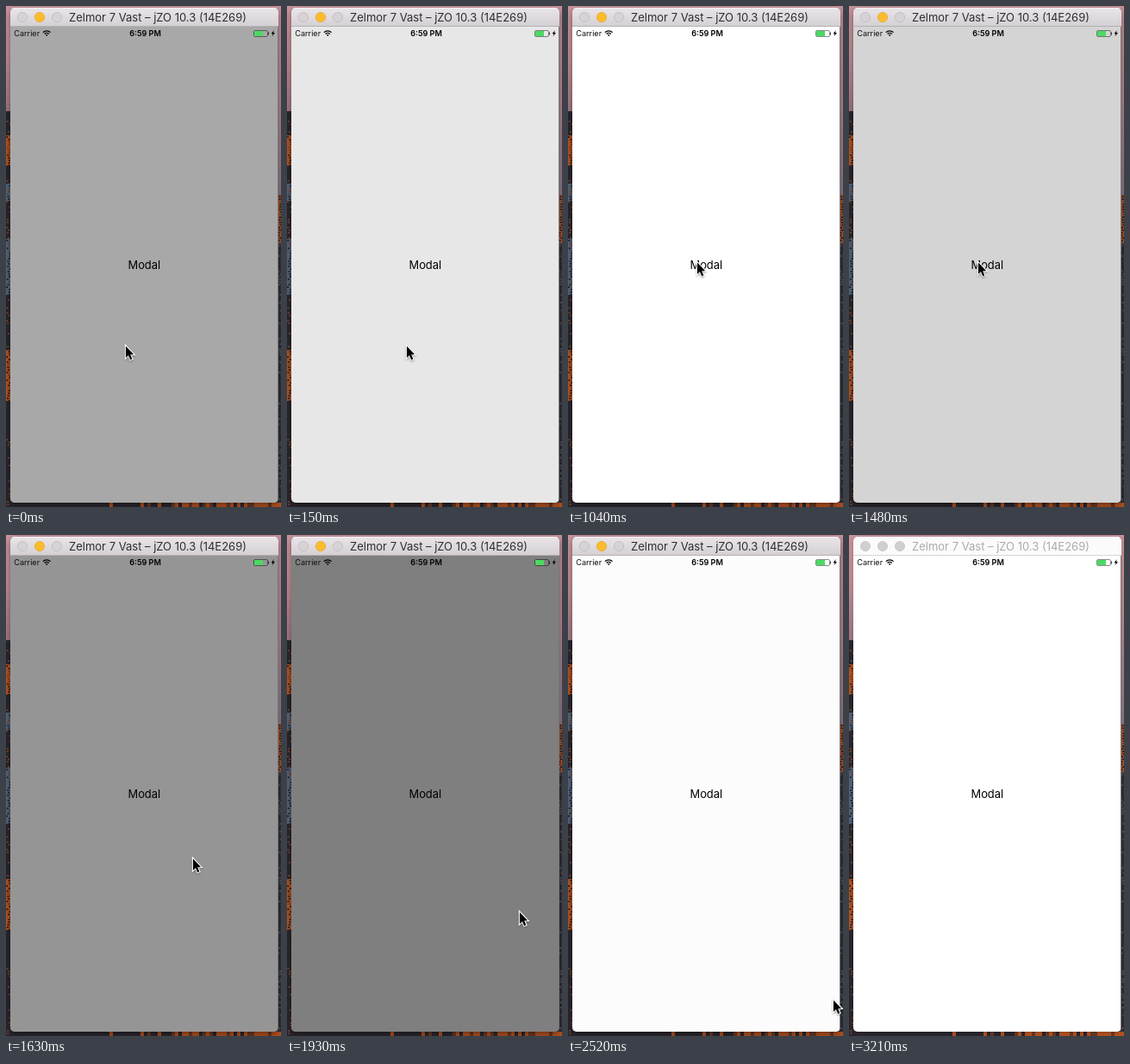
Animation, 319 px wide and 581 px high, one loop 3.23 s. Source, as an HTML page with a canvas:

```html
<!DOCTYPE html>
<html lang="en">
<head>
<meta charset="utf-8">
<title>Modal fade</title>
<style>
html, body { margin: 0; width: 100%; height: 100%; overflow: hidden; }
canvas { display: block; width: 319px; height: 581px; }
</style>
</head>
<body>
<canvas id="stage" width="319" height="581"></canvas>
<script>
const W = 319, H = 581, LOOP = 3230;
const TICK = 147.8;          // the picture is held for one tick at a time
const FADE_TICKS = 3;
const INACTIVE_AT = 3210;
const FONT = 'Inter, Roboto, sans-serif';
const DARK = '#29262d', ORANGE = '#b5521f', BLUE = '#50657c';
const ctx = document.getElementById('stage').getContext('2d');

const clamp = x => Math.min(1, Math.max(0, x));
const easeInOut = x => (1 - Math.cos(Math.PI * clamp(x))) / 2;
const easeOut = x => 1 - (1 - clamp(x)) ** 2;

function shadeAt(tick) {
  const fade = start => easeInOut((tick - start) / FADE_TICKS);
  const dim = 1 - fade(-1.15) + fade(8.82) - fade(14.27);
  return Math.round(255 - 128 * dim);
}

function pointerAt(tick) {
  let x = 138, y = 393;
  const move = (from, to, dx, dy) => {
    const p = easeOut((tick - from) / (to - from));
    x += dx * p;
    y += dy * p;
  };
  move(3, 4.6, 25, -105);
  move(5, 6.6, -14, 8);
  move(10, 13, 120, 140);
  move(15, 20, 60, 160);
  return [Math.round(x), Math.round(y)];
}

function seeded(seed) {
  return () => (seed = (seed * 16807) % 2147483647) / 2147483647;
}

function rect(x, y, w, h, color) {
  ctx.fillStyle = color;
  ctx.fillRect(x, y, w, h);
}

function gradient(y0, y1, ...colors) {
  const g = ctx.createLinearGradient(0, y0, 0, y1);
  colors.forEach((c, i) => g.addColorStop(i / (colors.length - 1), c));
  return g;
}

function text(str, x, y, size, color, weight = 400, align = 'center') {
  ctx.font = `${weight} ${size}px ${FONT}`;
  ctx.textAlign = align;
  ctx.fillStyle = color;
  ctx.fillText(str, x, y);
}

function polygon(points, fill, outline = 0) {
  ctx.beginPath();
  points.forEach(([x, y]) => ctx.lineTo(x, y));
  ctx.closePath();
  ctx.fillStyle = ctx.strokeStyle = fill;
  ctx.lineWidth = outline;
  if (outline) ctx.stroke();
  ctx.fill();
}

function windowPath() {
  ctx.beginPath();
  ctx.roundRect(5, 2, 311, 574, 5);
}

// Rock strip: each band runs down to the bottom until the next one covers it.
function cliff(x, bands) {
  bands.forEach(([y, color]) => rect(x, y, 6, H - y, color));
}

function desktop(active) {
  const rnd = seeded(47);
  rect(0, 0, W, H, DARK);
  cliff(0, [[122, DARK], [150, ORANGE], [185, DARK], [206, BLUE], [226, DARK],
    [270, BLUE], [335, DARK], [399, ORANGE], [458, DARK]]);
  cliff(313, [[219, ORANGE], [276, '#34333c']]);

  for (let y = 124; y < H; y += 3) {
    rect(rnd() * 4, y, 2, 2, rnd() < 0.7 ? DARK : '#75432c');
    if (y > 219) rect(315 + rnd() * 3, y, 2, 2, rnd() < 0.7 ? DARK : '#555058');
  }
  for (let x = 0; x < W; x += 4) {
    if (rnd() < (x - 100) / 180) rect(x, 576, 4, 5, rnd() < 0.7 ? ORANGE : '#6a3822');
  }
  rect(0, 0, W, 122, gradient(0, 122, '#cb949c', '#c08c95', '#a17681'));
  rect(310, 0, 9, 219, gradient(0, 219, '#c9929a', '#b5868f', '#8b7887'));

  ctx.save();
  ctx.shadowColor = `rgba(0,0,0,${active ? 0.42 : 0.22})`;
  ctx.shadowBlur = active ? 9 : 6;
  ctx.shadowOffsetY = active ? 3 : 1;
  windowPath();
  ctx.fillStyle = '#777';
  ctx.fill();
  ctx.restore();
}

function titleBar(active) {
  rect(5, 2, 311, 22, active ? gradient(2, 24, '#e9e5e9', '#d3cfd3') : '#fbfbfb');
  rect(5, 2, 311, 1, active ? '#f3f0f3' : '#fff');
  rect(5, 23, 311, 1, active ? '#b4b0b4' : '#d6d6d6');
  [19, 39, 59].forEach((x, i) => {
    const lit = active && i === 1;
    ctx.beginPath();
    ctx.arc(x, 13, 5.6, 0, Math.PI * 2);
    ctx.fillStyle = lit ? '#fdbc2e' : active ? '#d6d2d6' : '#cfcfcf';
    ctx.fill();
    ctx.strokeStyle = lit ? '#e6a62a' : active ? '#bebabe' : '#c6c6c6';
    ctx.lineWidth = 0.8;
    ctx.stroke();
  });
  text('Zelmor 7 Vast – jZO 10.3 (14E269)', 176, 18, 13, active ? '#302e31' : '#ababab');
}

function wifi(x, y) {
  const arc = r => {
    ctx.beginPath();
    ctx.arc(x, y, r, -Math.PI * 0.75, -Math.PI * 0.25);
  };
  ctx.strokeStyle = ctx.fillStyle = '#000';
  ctx.lineWidth = 1.3;
  [3.6, 6.2].forEach(r => {
    arc(r);
    ctx.stroke();
  });
  arc(1.9);
  ctx.lineTo(x, y);
  ctx.fill();
}

function statusBar() {
  text('Carrier', 9.3, 35, 9.1, '#111', 400, 'left');
  wifi(47.2, 35);
  text('6:59 PM', 161.5, 35, 9.1, '#000', 600);
  ctx.beginPath();
  ctx.roundRect(287.5, 28.5, 16, 7, 1.5);
  ctx.strokeStyle = 'rgba(0,0,0,.65)';
  ctx.lineWidth = 0.7;
  ctx.stroke();
  rect(288, 29, 10, 6, '#4cd964');
  rect(304, 30.5, 1, 3, 'rgba(0,0,0,.7)');
  polygon([[310.8, 28], [307.6, 32.2], [309.5, 32.2], [308.6, 35.3], [312, 30.9], [310, 30.9]], '#000');
}

function cursor([x, y]) {
  const shape = [[0, 0], [0, 13.2], [3, 10.4], [5.3, 15.6], [7.3, 14.7], [5.1, 9.7], [9, 9.4]]
    .map(([dx, dy]) => [x + 1 + dx, y + 1.6 + dy]);
  ctx.save();
  ctx.shadowColor = 'rgba(0,0,0,.3)';
  ctx.shadowBlur = 2;
  ctx.shadowOffsetY = 1;
  polygon(shape, '#fff', 2.4);
  ctx.restore();
  polygon(shape, '#000');
}

function draw(t) {
  const active = t < INACTIVE_AT;
  const tick = Math.floor(t / TICK);
  const shade = shadeAt(tick);
  desktop(active);
  ctx.save();
  windowPath();
  ctx.clip();
  rect(5, 24, 310, 552, `rgb(${shade},${shade},${shade})`);
  titleBar(active);
  ctx.restore();
  statusBar();
  text('Modal', 160.3, 304.6, 12.9, '#000');
  cursor(pointerAt(tick));
}

function animate() {
  draw(performance.now() % LOOP);
  requestAnimationFrame(animate);
}
animate();
</script>
</body>
</html>
```
